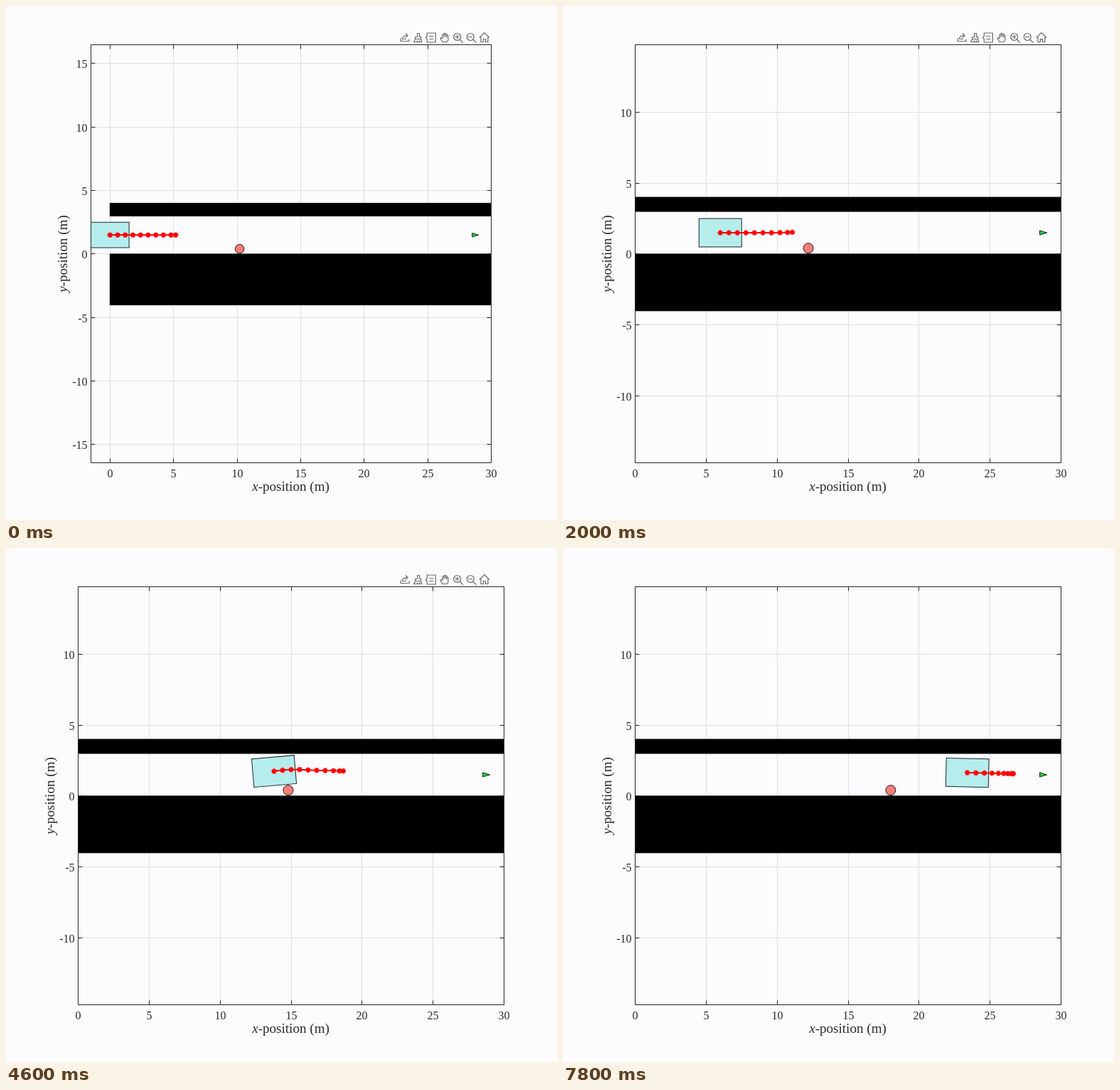
An HTML page that plays this animation: 775 px wide and 723 px high, repeating every 8 s.

```html
<!DOCTYPE html>
<html lang="en">
<head>
<meta charset="utf-8">
<title>Corridor path planner</title>
<style>
  html, body { margin: 0; width: 100%; height: 100%; overflow: hidden; background: #fcfcff; }
  svg { display: block; width: 775px; height: 723px; }
  text { font-family: "Liberation Serif", serif; font-size: 16px; fill: #2a2a2a; }
  .label { font-size: 19.1px; text-anchor: middle; fill: #2a2a2a; }
  .x-tick { text-anchor: middle; }
  .y-tick { text-anchor: end; }
  .grid { stroke: #dedee4; fill: none; }
  .axes { stroke: #262626; fill: none; }
  .wall { fill: #000; stroke: #000; }
  .car { fill: #b5eded; stroke: #1c2626; }
  .walker { fill: #fb8079; stroke: #201010; }
  .goal { fill: #22dc48; stroke: #0a200c; }
  .plan { fill: none; stroke: #f00; stroke-width: 2; }
  .tools { fill: none; stroke: #6a6a6c; stroke-width: 1.2; }
</style>
</head>
<body>
<svg viewBox="0 0 775 723">
  <g id="plot"></g>
  <text class="label" x="400.5" y="682"><tspan font-style="italic">x</tspan>-position (m)</text>
  <g id="tools" class="tools"></g>
</svg>
<script>
const STEP = 200, STEPS = 40;
const TOP = 54.5, BOTTOM = 642.5, MIDDLE = 348.9;
const plot = document.getElementById('plot');
const tools = document.getElementById('tools');

// Keys are [step, value].
const lateral = [[0, 1.5], [16, 1.5], [18, 1.525], [20, 1.57], [22, 1.67], [24, 1.82],
  [25.5, 1.88], [28, 1.81], [34, 1.72], [39, 1.645], [48, 1.53]];
const heading = [[0, 0], [14, 0], [18, .033], [21, .055], [23, .085], [24.5, .045],
  [26.5, -.02], [28, -.025], [34, -.027], [39, -.023]];
const lastStride = [[0, .37], [10, .34], [18, .3], [28, .23], [34, .13], [39, .045]];
const strideGain = [[0, .23], [10, .19], [18, .18], [28, .14], [34, .115], [39, .082]];

const icons = [
  'M-6 1V5H6V2M-4 2C-3-2 0-3 3-3M1-6L4-3L1 0M-4 2H2',
  'M-1-6H2V-1H4V2H-4V-1H-1ZM-4 2L-6 6H5L4 2M-1 6V4M2 6V4',
  'M-6-2V-6.5H6V6.5H-6V2L-8 0ZM-3-2H3M-3 2H3',
  'M-3 6L-6 1Q-6-1-3 1V-4Q-2-6-1-4V-1V-5.5Q0-7 1-5.5V-1V-5Q2-6 3-5V0V-3Q5-4 5-2V2Q5 5 3 6Z',
  'M4-1A5 5 0 1 1-6-1A5 5 0 1 1 4-1M2.5 2.5L7 7M-4-1H2M-1-4V2',
  'M4-1A5 5 0 1 1-6-1A5 5 0 1 1 4-1M2.5 2.5L7 7M-4-1H2',
  'M-7 0L0-7L7 0M-5-1V6H-1.5V2H1.5V6H5V-1'
];
tools.innerHTML = icons.map((d, i) =>
  `<path d="${d}" transform="translate(${561 + i * 18.65} 44.5)"/>`).join('');

function sample(keys, at) {
  const i = Math.max(1, keys.findIndex(key => key[0] >= at));
  const [a, u] = keys[i - 1], [b, v] = keys[i];
  return u + (v - u) * (at - a) / (b - a);
}

const half = v => Math.floor(v) + .5;

function makeView(step) {
  const xMin = Math.min(0, .6 * step - 1.5);
  const [left, right] = step ? [101.5, 700.5] : [119.5, 682.5];
  const scale = (right - left) / (30 - xMin);
  return {
    left, right, scale,
    x: v => left + (v - xMin) * scale,
    y: v => MIDDLE - v * scale
  };
}

function drawAxes(view) {
  const { left, right, scale } = view;
  let grid = '', ticks = `M${left} ${TOP}H${right}V${BOTTOM}H${left}Z`, labels = '';
  for (let v = 0; v <= 30; v += 5) {
    const x = half(view.x(v));
    grid += `M${x} ${TOP}V${BOTTOM}`;
    ticks += `M${x} ${TOP}v6M${x} ${BOTTOM}v-6`;
    labels += `<text class="x-tick" x="${x}" y="663">${v}</text>`;
  }
  const limit = (BOTTOM - TOP) / 2 / scale;
  for (let v = -15; v <= 15; v += 5) {
    if (Math.abs(v) > limit) continue;
    const y = half(view.y(v));
    grid += `M${left} ${y}H${right}`;
    ticks += `M${left} ${y}h6M${right} ${y}h-6`;
    labels += `<text class="y-tick" x="${left - 5}" y="${y + 6.2}">${v}</text>`;
  }
  labels += `<text class="label" transform="translate(${left - 34} 348.5) rotate(-90)">` +
    '<tspan font-style="italic">y</tspan>-position (m)</text>';
  return { grid: `<path class="grid" d="${grid}"/>`, frame: `<path class="axes" d="${ticks}"/>${labels}` };
}

function drawWall(view, low, high) {
  const x = view.x(0), y = view.y(high);
  return `<rect class="wall" x="${x}" y="${y}" width="${view.right - x}" height="${(high - low) * view.scale}"/>`;
}

function drawCar(view, step) {
  const s = view.scale, turn = -sample(heading, step) * 180 / Math.PI;
  const place = `translate(${view.x(.6 * step)} ${view.y(sample(lateral, step))}) rotate(${turn})`;
  return `<rect class="car" transform="${place}" x="${-1.5 * s}" y="${-s}" width="${3 * s}" height="${2 * s}"/>`;
}

function drawPlan(view, step) {
  const last = sample(lastStride, step), gain = sample(strideGain, step);
  let x = .6 * step, line = '', stars = '';
  for (let left = 9; left >= 0; left--) {
    const px = view.x(x), py = view.y(sample(lateral, x / .6));
    line += `${line ? 'L' : 'M'}${px} ${py}`;
    for (let arm = 0; arm < 4; arm++) {
      const dx = 3.7 * Math.cos(arm * Math.PI / 4), dy = 3.7 * Math.sin(arm * Math.PI / 4);
      stars += `M${px - dx} ${py - dy}l${2 * dx} ${2 * dy}`;
    }
    x += Math.min(.6, last + gain * (left - 1));
  }
  return `<path class="plan" d="${line}"/><path class="plan" d="${stars}"/>`;
}

function draw(step) {
  const view = makeView(step), axes = drawAxes(view), s = view.scale;
  const walker = `<circle class="walker" cx="${view.x(10.2 + .2 * step)}" cy="${view.y(.41)}" r="${.35 * s}"/>`;
  const goal = `<path class="goal" d="M${view.x(28.5)} ${view.y(1.65)}L${view.x(29)} ${view.y(1.5)}L${view.x(28.5)} ${view.y(1.35)}Z"/>`;
  plot.innerHTML = axes.grid + drawWall(view, 3, 4) + drawWall(view, -4, 0) +
    drawCar(view, step) + drawPlan(view, step) + walker + goal + axes.frame;
  tools.setAttribute('transform', `translate(${step < 26 ? 0 : 18.7} 0)`);
  tools.setAttribute('visibility', step < 29 ? 'visible' : 'hidden');
}

const start = performance.now();
let shown = -1;
function tick() {
  const step = Math.floor((performance.now() - start) / STEP) % STEPS;
  if (step !== shown) draw(shown = step);
  requestAnimationFrame(tick);
}
tick();
</script>
</body>
</html>
```
